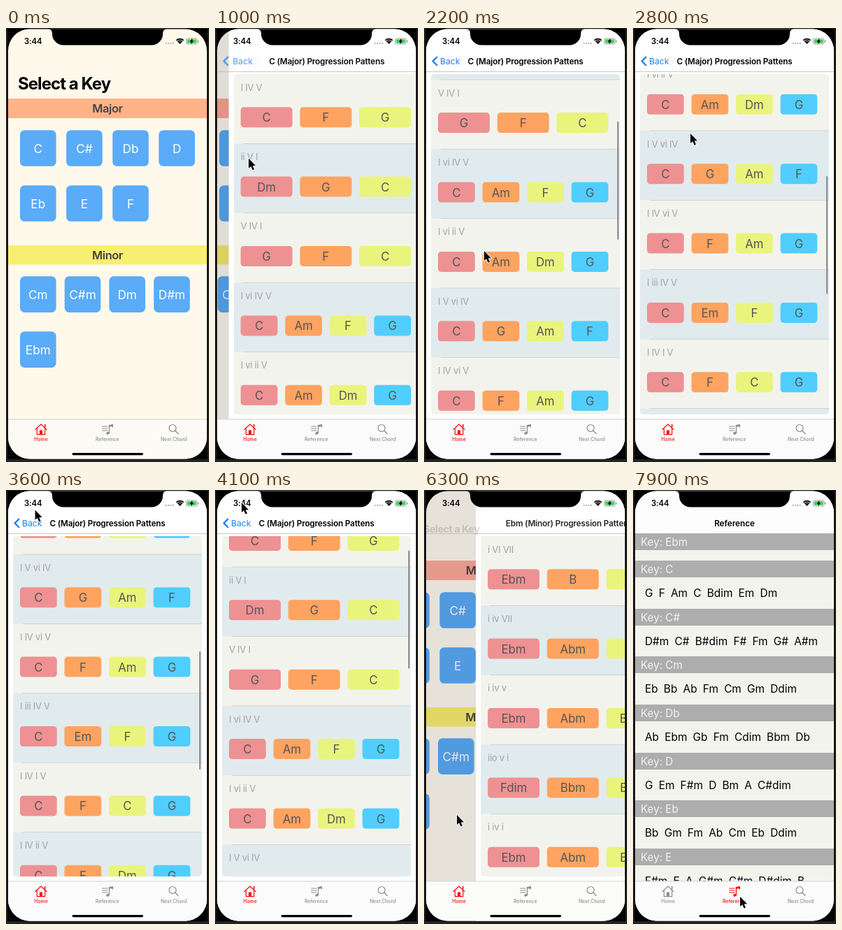
Write an HTML page with a canvas that moves like this. It is 290 px wide and 621 px high and loops after 8000 ms.

```html
<!DOCTYPE html>
<html lang="en">
<head>
<meta charset="utf-8">
<title>Chord keys</title>
<style>
html, body { margin: 0; width: 100%; height: 100%; overflow: hidden; background: #232323; }
canvas { display: block; width: 290px; height: 621px; }
</style>
</head>
<body>
<canvas id="stage"></canvas>
<script>
const W = 290, H = 621, LOOP = 8000, STEP = 100;
const canvas = document.getElementById('stage');
const c = canvas.getContext('2d');
const dpr = window.devicePixelRatio || 1;
canvas.width = W * dpr;
canvas.height = H * dpr;

const L = 3, R = 287, PAGE = R - L, ROW = 99.4, LARGE = 71;
const BLUE = '#2080f0', RED = '#fb0d0d', GRAY = '#8e8e8e';
const CHORD_COLORS = ['#ee9193', '#ffa360', '#e9f47c', '#50ceff'];

const MAJOR_ROWS = ['I IV V|C F G', 'ii V I|Dm G C', 'V IV I|G F C', 'I vi IV V|C Am F G',
  'I vi ii V|C Am Dm G', 'I V vi IV|C G Am F', 'I IV vi V|C F Am G', 'I iii IV V|C Em F G',
  'I IV I V|C F C G', 'I IV ii V|C F Dm G'];
const MINOR_ROWS = ['i VI VII|Ebm B Db', 'i iv VII|Ebm Abm Db', 'i iv v|Ebm Abm Bbm',
  'iio v i|Fdim Bbm Ebm', 'i iv i|Ebm Abm Ebm'];
const REFERENCE = ['C|G F Am C Bdim Em Dm', 'C#|D#m C# B#dim F# Fm G# A#m',
  'Cm|Eb Bb Ab Fm Cm Gm Ddim', 'Db|Ab Ebm Gb Fm Cdim Bbm Db', 'D|G Em F#m D Bm A C#dim',
  'Eb|Bb Gm Fm Ab Cm Eb Ddim', 'E|F#m E A G#m C#m D#dim B'];

const PAGES = {
  major: { title: 'C (Major) Progression Pattens', large: 'C (Major) Progression P…', rows: MAJOR_ROWS },
  minor: { title: 'Ebm (Minor) Progression Pattens', large: '', rows: MINOR_ROWS }
};

const PUSH_MAJOR = 650, POP_MAJOR = 5029, PUSH_MINOR = 6093, TAB_TAP = 7400;

// pointer moves: start, end, x, y
const MOVES = [[100, 500, 45, 178], [950, 1300, 100, 335], [1300, 1800, 97, 248], [1800, 2150, 86, 322],
  [2150, 2800, 82, 151], [2800, 3770, 38, 18], [4100, 4700, 28, 49], [5200, 6000, 47, 465], [6500, 7200, 153, 582]];
// list scrolls: start, duration, distance
const FLICKS = [[1300, 500, 128], [2100, 1532, 343], [3850, 650, -542]];

const clamp = (v, a = 0, b = 1) => Math.min(b, Math.max(a, v));
const mix = (a, b, k) => a + (b - a) * k;
const mixRgb = (a, b, k) => `rgb(${a.map((v, i) => Math.round(mix(v, b[i], k)))})`;
const smooth = k => k * k * (3 - 2 * k);
const easeOut = k => 1 - (1 - k) ** 3;

function pointerAt(t) {
  let x = -14, y = 150;
  for (const [start, end, tx, ty] of MOVES) {
    const k = smooth(clamp((t - start) / (end - start)));
    x = mix(x, tx, k);
    y = mix(y, ty, k);
  }
  return [x, y];
}

const scrollAt = t => FLICKS.reduce((s, [start, time, dist]) => s + dist * easeOut(clamp((t - start) / time)), LARGE);

function spring(t, start) {
  const w = 0.013 * Math.max(0, t - start);
  return w > 7 ? 1 : 1 - (1 + w) * Math.exp(-w);
}

function text(s, x, y, size, o = {}) {
  c.save();
  c.globalAlpha *= o.alpha ?? 1;
  c.font = `${o.weight || 400} ${size}px Inter, Roboto, sans-serif`;
  c.letterSpacing = (o.space || 0) * size + 'px';
  c.textAlign = o.align || 'left';
  c.fillStyle = o.color || '#000';
  c.fillText(s, x, y + size * 0.36);
  const width = c.measureText(s).width;
  c.restore();
  return width;
}
const centered = (s, x, y, size, o) => text(s, x, y, size, { ...o, align: 'center' });

function rect(x, y, w, h, color) {
  c.fillStyle = color;
  c.fillRect(x, y, w, h);
}

function round(x, y, w, h, r, color) {
  c.beginPath();
  c.roundRect(x, y, w, h, r);
  if (!color) return;
  c.fillStyle = color;
  c.fill();
}

function line(points, color, width) {
  c.beginPath();
  points.forEach(([x, y]) => c.lineTo(x, y));
  c.strokeStyle = color;
  c.lineWidth = width;
  c.stroke();
}

function shifted(dx, draw) {
  c.save();
  c.translate(dx, 0);
  draw();
  c.restore();
}

function tiles(names, x, y, pitch) {
  names.split(' ').forEach((name, i) => {
    const tx = x + (i % 4) * pitch, ty = y + Math.floor(i / 4) * 79;
    round(tx, ty, 51.6, 51.6, 6.5, '#5aabf8');
    centered(name, tx + 25.8, ty + 26.3, 17.2, { color: '#fff' });
  });
}

// q: how far the next page covers this one
function home(q) {
  rect(L, 0, PAGE, H, mixRgb([255, 249, 236], [255, 251, 244], q));
  shifted(-85 * q, () => {
    const head = { weight: 600, color: '#444', space: -0.025 };
    rect(L, 101, PAGE + 85, 28, mixRgb([255, 179, 135], [255, 170, 153], clamp(q * 2)));
    centered('Major', 145, 115.5, 16.4, head);
    tiles('C C# Db D Eb E F', 20, 146.2, 66.1);
    rect(L, 311, PAGE + 85, 27.5, '#f8ee70');
    centered('Minor', 145, 325, 16.4, head);
    tiles('Cm C#m Dm D#m Ebm', 20, 355.3, 63.7);
  });
  rect(L, 0, PAGE, H, `rgba(0,0,0,${0.13 * q})`);
}

function chordRow(row, i, y) {
  const [label, list] = row.split('|');
  const chords = list.split(' '), n = chords.length, gap = 10.8;
  const w = (243.3 - gap * (n - 1)) / n;
  rect(10, y, 270, ROW + 0.5, i % 2 ? '#e1ebed' : '#f3f3ed');
  if (i) rect(24, y - 0.4, 256, 0.8, '#c9cccb');
  text(label, 20, y + 19, 13, { color: '#a2a4a3', space: -0.02 });
  chords.forEach((name, k) => {
    const x = 20 + k * (w + gap);
    round(x, y + 47.2, w, 29, 4.5, CHORD_COLORS[k]);
    centered(name, x + w / 2, y + 62.2, 16.8, { color: '#555' });
  });
}

function detail(page, scroll, q, thumb) {
  const top = Math.max(66, 137 - scroll);
  shifted(PAGE * (1 - q), () => {
    rect(L, 0, PAGE, H, '#fefefe');
    c.save();
    round(10, top, 270, 553 - top, 5);
    c.clip();
    page.rows.forEach((row, i) => chordRow(row, i, 137 - scroll + i * ROW));
    c.restore();
    if (thumb > 0) {
      const y = 67.5 + (scroll - LARGE) * 0.347, y0 = Math.max(y, top + 1);
      c.globalAlpha = thumb;
      round(276, y0, 2.2, y + 169 - y0, 1.1, '#8b8d8d');
      c.globalAlpha = 1;
    }
  });
  c.globalAlpha = clamp((scroll - 45) / 20);
  rect(L, 62, PAGE, 0.8, '#bcbcbc');
  c.globalAlpha = 1;
}

function chevron(alpha) {
  c.globalAlpha = alpha;
  c.lineCap = c.lineJoin = 'round';
  line([[18.4, 41.6], [12.6, 47.4], [18.4, 53.2]], BLUE, 2.2);
  c.globalAlpha = 1;
}

function largeTitle(s, x, y, alpha, size = 24, color = '#000') {
  text(s, x, y, size, { weight: 700, alpha, color, space: -0.04 });
}

function pageTitles(page, scroll, p) {
  const small = clamp((scroll - 45) / 20);
  centered(page.title, 145 + p * PAGE * 0.88, 47.5, 11.7,
    { weight: 600, alpha: small * (1 - p * 0.6), space: -0.012 });
  if (scroll >= LARGE) return;
  c.save();
  c.beginPath();
  c.rect(L, 60, PAGE, 60);
  c.clip();
  const fade = c.createLinearGradient(260, 0, R, 0);
  fade.addColorStop(0, '#000');
  fade.addColorStop(1, 'rgba(0,0,0,.15)');
  largeTitle(p > 0 ? page.title : page.large, 17 + p * 203, 79.5 - scroll,
    (1 - small) * (1 - p * 0.9), 24, p > 0 ? fade : '#000');
  c.restore();
}

function navBar(page, scroll, q, popping) {
  const p = 1 - q;
  if (!page) return largeTitle('Select a Key', 17, 79.5, 1);
  pageTitles(page, scroll, p);
  if (popping) {
    chevron(clamp(1 - p * 5));
    text('Back', mix(23, 26, p), mix(47.5, 72, p), mix(12.2, 20, p),
      { color: p > 0 ? '#7a9ab5' : BLUE, alpha: clamp(1 - p * 3) });
    largeTitle('Select a Key', mix(17, 20, q), mix(79.5, 48, q), clamp((p - 0.35) / 0.6), mix(24, 12, q));
  } else {
    const k = clamp((q - 0.75) * 4);
    chevron(k);
    text('Back', 23 + p * 40, 47.5, 12.2, { color: BLUE, alpha: k });
    largeTitle('Select a Key', mix(-7, 17, p), mix(48, 79.5, p), p ** 1.4, mix(11.5, 24, p));
  }
}

function reference() {
  const bar = (y, key) => {
    rect(L, y, PAGE, 24, '#adadad');
    text('Key: ' + key, 11, y + 12.6, 15.2, { color: '#f1f1f1' });
  };
  rect(L, 0, PAGE, H, '#f3f3ed');
  rect(L, 0, PAGE, 62, '#fdfdfd');
  bar(62, 'Ebm');
  REFERENCE.forEach((entry, i) => {
    const [key, chords] = entry.split('|'), y = Math.round(101 + i * 68.65);
    bar(y, key);
    let x = 17;
    for (const chord of chords.split(' ')) x += text(chord, x, y + 46.5, 15.4) + 8.2;
  });
  centered('Reference', 145, 47.5, 11.7, { weight: 600 });
}

function tabBar(onReference, tint) {
  const [a, b] = onReference ? [GRAY, RED] : [RED, GRAY];
  rect(L, 559.5, PAGE, H, mixRgb([252, 250, 244], [251, 251, 251], tint));
  rect(L, 559.5, PAGE, 0.8, '#c9c7c2');
  c.lineCap = c.lineJoin = 'round';
  // house
  line([[42, 574.5], [50, 567], [58, 574.5]], a, 1.2);
  line([[44.3, 573], [44.3, 581.6], [55.7, 581.6], [55.7, 573]], a, 1.2);
  line([[55.7, 571], [55.7, 567.6]], a, 1.6);
  rect(48, 575.5, 4, 6, a);
  // note
  for (let i = 0; i < 3; i++) line([[137.5, 570 + i * 3], [145, 570 + i * 3]], b, 1);
  line([[147.5, 579.5], [147.5, 568.6], [152.4, 567.6], [152.4, 571]], b, 1.3);
  line([[147.8, 569.6], [152, 568.8]], b, 2.2);
  c.beginPath();
  c.ellipse(145.5, 579.8, 2.4, 1.9, -0.3, 0, 7);
  c.fillStyle = b;
  c.fill();
  // magnifier
  round(233, 567.5, 10, 10, 5);
  c.strokeStyle = GRAY;
  c.lineWidth = 1.2;
  c.stroke();
  line([[241.8, 576.3], [246, 580.5]], GRAY, 1.4);
  ['Home', 'Reference', 'Next Chord'].forEach((name, i) =>
    centered(name, 50 + i * 94.8, 588.7, 6.9, { color: [a, b, GRAY][i], weight: 500 }));
  round(94.5, 608, 101.5, 3.2, 1.6, '#000');
}

function statusBar() {
  text('3:44', 26, 19, 11.3, { weight: 600, space: -0.01 });
  for (let i = 0; i < 4; i++) round(227.5 + i * 3.4, 20.8, 2.2, 2.2, 1, '#b5b3ae');
  c.lineCap = 'butt';
  c.strokeStyle = '#000';
  for (const r of [2, 4.8, 7.4]) {
    c.beginPath();
    c.arc(248.5, 23, r, -Math.PI * 0.75, -Math.PI * 0.25);
    c.lineWidth = r === 2 ? 3.2 : 1.7;
    c.stroke();
  }
  round(257.4, 14.9, 15.6, 8.2, 2.2);
  c.strokeStyle = '#8f8f8f';
  c.lineWidth = 0.8;
  c.stroke();
  round(258.7, 16.2, 13, 5.6, 1.2, '#3fcf5c');
  round(274, 17.6, 1.2, 3, 0.6, '#8f8f8f');
  line([[266.2, 16], [263.8, 19.2], [266.6, 18.8], [264.4, 22.2]], '#000', 1.4);
}

function notch() {
  round(66, -20, 158, 44.5, 16, '#000');
  for (const side of [-1, 1]) {
    const x = 145 + side * 79;
    c.beginPath();
    c.moveTo(x, 0);
    c.lineTo(x + side * 6, 1.5);
    c.quadraticCurveTo(x, 1.5, x, 8);
    c.fill();
  }
}

function pointer(x, y) {
  c.save();
  c.translate(x, y);
  c.beginPath();
  [[0, 0], [0, 14], [3.2, 11.2], [5.6, 16.6], [8, 15.6], [5.7, 10.4], [10, 10.2]].forEach(p => c.lineTo(...p));
  c.closePath();
  c.lineJoin = 'round';
  c.lineWidth = 1.8;
  c.strokeStyle = '#fff';
  c.stroke();
  c.fillStyle = '#000';
  c.fill();
  c.restore();
}

function homeTab(t) {
  const minor = t >= 6000, popping = t >= 4500 && !minor;
  const q = minor ? spring(t, PUSH_MINOR) : spring(t, PUSH_MAJOR) - spring(t, POP_MAJOR);
  const page = q > 0.001 ? PAGES[minor ? 'minor' : 'major'] : null;
  const scroll = minor ? LARGE : scrollAt(t);
  const thumb = minor ? 0 : clamp((t - 1300) / 100) * clamp((4700 - t) / 200);
  home(q);
  if (page) detail(page, scroll, q, thumb);
  navBar(page, scroll, q, popping);
  tabBar(false, q);
}

function render(t) {
  c.setTransform(dpr, 0, 0, dpr, 0, 0);
  rect(0, 0, W, H, '#232323');
  rect(L - 1, 1, PAGE + 2, 616, '#000');
  c.save();
  round(L, 1.5, PAGE, 615, 31);
  c.clip();
  if (t < TAB_TAP) {
    homeTab(t);
  } else {
    reference();
    tabBar(true, 1);
  }
  statusBar();
  notch();
  c.restore();
  pointer(...pointerAt(t));
}

const begin = performance.now();
function frame() {
  const t = (performance.now() - begin) % LOOP;
  render(Math.floor(t / STEP) * STEP);
  requestAnimationFrame(frame);
}
frame();
</script>
</body>
</html>
```
